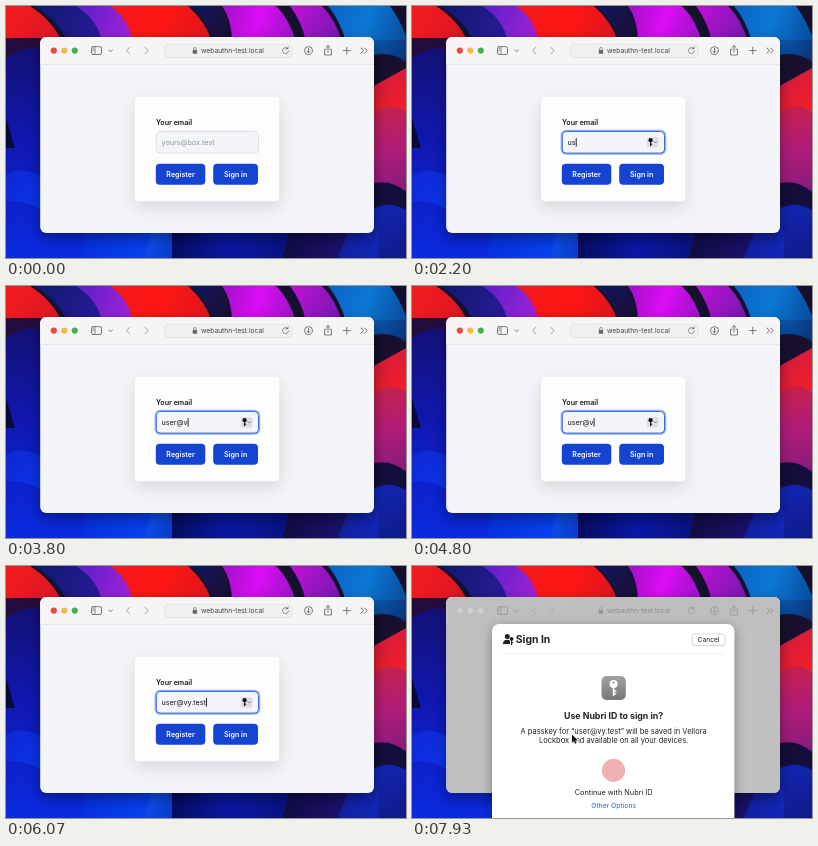
Write an HTML page with a canvas that moves like this. It is 400 px wide and 252 px high and loops after 8000 ms.

```html
<!DOCTYPE html>
<html lang="en">
<head>
<meta charset="utf-8">
<title>Passkey registration</title>
<style>
html, body { margin: 0; width: 100%; height: 100%; overflow: hidden; }
canvas { display: block; width: 400px; height: 252px; }
</style>
</head>
<body>
<canvas id="stage"></canvas>
<script>
const LOOP = 8000;
const FONT = 'Inter, "Liberation Sans", sans-serif';
const EMAIL = 'user@vy.test';
const KEY_TIMES = [2000, 2140, 2330, 2480, 2950, 3300, 4900, 5060, 5260, 5420, 5560, 5700];
const FOCUS = 1260, PRESS = 6860, SHEET = 7300;

const canvas = document.getElementById('stage');
const dpr = window.devicePixelRatio || 1;
canvas.width = 400 * dpr;
canvas.height = 252 * dpr;
const g = canvas.getContext('2d');
g.scale(dpr, dpr);

const clamp = x => Math.max(0, Math.min(1, x));
const ease = x => { x = clamp(x); return x * x * (3 - 2 * x); };
const mix = (a, b, k) => a + (b - a) * k;

function fade(x0, y0, x1, y1, ...colors) {
  const f = g.createLinearGradient(x0, y0, x1, y1);
  colors.forEach((c, i) => f.addColorStop(i / (colors.length - 1), c));
  return f;
}

function shape(d, fill) {
  g.fillStyle = fill;
  g.fill(new Path2D(d));
}

function line(d, color, width = 0.8) {
  g.strokeStyle = color;
  g.lineWidth = width;
  g.lineCap = g.lineJoin = 'round';
  g.stroke(new Path2D(d));
}

function box(x, y, w, h, r, fill, stroke, width = 0.7) {
  g.beginPath();
  g.roundRect(x, y, w, h, r);
  if (fill) { g.fillStyle = fill; g.fill(); }
  if (stroke) { g.strokeStyle = stroke; g.lineWidth = width; g.stroke(); }
}

function dot(x, y, r, fill) {
  g.beginPath();
  g.arc(x, y, r, 0, 7);
  g.fillStyle = fill;
  g.fill();
}

function shadowed(blur, dy, alpha, draw) {
  g.save();
  g.shadowColor = `rgba(0,0,0,${alpha})`;
  g.shadowBlur = blur * dpr;
  g.shadowOffsetY = dy * dpr;
  draw();
  g.restore();
}

function text(s, x, y, color, size = 7.2, weight = 400, align = 'left') {
  g.font = `${weight} ${size}px ${FONT}`;
  g.textAlign = align;
  g.fillStyle = color;
  g.fillText(s, x, y);
}

function wallpaper() {
  g.fillStyle = fade(0, 30, 20, 252, '#14106e', '#1018b4', '#0a2ae0');
  g.fillRect(0, 0, 400, 252);
  // top edge
  shape('M0 0H400V36H0Z', '#15102e');
  shape('M0 0H24Q46 14 56 36H0Z', fade(0, 0, 56, 36, '#f41c1c', '#d81626'));
  shape('M28 0H72Q92 14 100 36H62Q52 14 28 0Z', fade(35, 0, 95, 36, '#101a6e', '#2a1a9c'));
  shape('M70 0H112Q126 16 128 36H96Q92 14 70 0Z', fade(72, 0, 128, 30, '#5a20c8', '#a422d8'));
  shape('M104 0H182Q200 16 206 36H126Q124 14 104 0Z', fade(104, 0, 206, 20, '#f01a1e', '#ff1612', '#e01420'));
  shape('M184 0H214Q224 14 226 36H208Q204 16 184 0Z', fade(184, 0, 226, 20, '#10155e', '#1a1038'));
  shape('M216 0H270Q284 14 290 36H226Q226 14 216 0Z', fade(216, 0, 290, 24, '#a010c8', '#dc0cf4', '#9c14c8'));
  shape('M284 0H316Q330 14 336 36H300Q296 16 284 0Z', fade(284, 0, 336, 24, '#c010d8', '#7a18b0'));
  shape('M322 0H384Q394 14 400 30V36H340Q334 14 322 0Z', fade(322, 0, 400, 30, '#0c62c8', '#0a78d4', '#0a4c9c'));
  // left edge
  shape('M0 32H38V44Q18 38 0 52Z', '#240c3c');
  shape('M0 112L9 142H0Z', '#0a0a3a');
  shape('M0 168Q20 160 38 172V206Q18 192 0 196Z', fade(0, 165, 36, 200, '#1026d0', '#0a36ee'));
  // right edge
  shape('M364 34H400V58Q384 46 364 52Z', fade(366, 34, 400, 55, '#0a58b0', '#0a3478'));
  shape('M364 50Q384 44 400 56V70L364 84Z', '#18102e');
  shape('M364 82L400 62V108Q384 96 364 110Z', fade(370, 70, 400, 108, '#d41a3c', '#f42028'));
  shape('M364 108Q384 94 400 106V184H364Z', fade(370, 105, 390, 184, '#c4204e', '#b01c78', '#8a1c7c'));
  shape('M364 178Q384 172 400 186V206Q384 196 364 206Z', '#140e3c');
  shape('M364 204Q384 194 400 204V252H364Z', fade(366, 200, 400, 252, '#1226b8', '#0e1a86'));
  // bottom edge
  shape('M74 252L80 224H148L140 252Z', fade(78, 230, 146, 252, '#0630e0', '#0642f0'));
  shape('M138 252L146 224H170L166 252Z', fade(140, 230, 168, 252, '#0a52f0', '#0a38c8'));
  shape('M166 252V224H284L276 252Z', fade(166, 240, 282, 240, '#060c60', '#0818a4', '#0a1280'));
  shape('M276 252L284 224H344L332 252Z', fade(278, 240, 342, 240, '#100c44', '#1a1270'));
  shape('M332 252L344 224H372V252Z', fade(334, 240, 372, 240, '#1020a0', '#1226b8'));
}

function toolbar() {
  box(34.2, 31, 333.8, 27.5, [6, 6, 0, 0], '#f7f4f6');
  g.fillStyle = '#dfdce0';
  g.fillRect(34.2, 58, 333.8, 0.6);
  ['#f2453f', '#f7b845', '#3cb54e'].forEach((c, i) => dot(47.8 + 10.5 * i, 44.6, 3.1, c));
  const ink = '#5d5b60', pale = '#96949a';
  box(85.5, 40.7, 10, 7.8, 1.5, null, ink, 0.8);
  line('M89 41V48M86.8 42.8H87.7M86.8 44.4H87.7', ink, 0.7);
  line('M102.8 44L104.6 45.6L106.4 44', ink, 0.8);
  line('M123.7 41.4L120.5 44.6L123.7 47.8', pale, 0.9);
  line('M139 41.4L142.2 44.6L139 47.8', pale, 0.9);
  box(158.2, 38.2, 128, 13.3, 3.5, '#f2eff1', '#dedbdf', 0.6);
  box(186.7, 44, 4.4, 3.7, 0.7, '#69676c');
  line('M187.6 44V42.8A1.3 1.3 0 0 1 190.2 42.8V44', '#69676c', 0.7);
  text('webauthn-test.local', 195, 47.1, '#434146', 6.7);
  line('M281.7 42.5A3 3 0 1 0 282.5 45M282 40.8V42.8H280', ink, 0.7);
  g.beginPath();
  g.arc(302.5, 44.6, 4, 0, 7);
  g.lineWidth = 0.8;
  g.stroke();
  line('M302.5 42.3V46.6M300.9 45.1L302.5 46.7L304.1 45.1', ink);
  line('M320.2 43.2H318.6V49H325.4V43.2H323.8M322 46V39.7M320.3 41.2L322 39.6L323.7 41.2', ink);
  line('M337.3 44.6H344.3M340.8 41.1V48.1', ink);
  line('M355 42L357.5 44.6L355 47.2M358.5 42L361 44.6L358.5 47.2', ink, 0.9);
}

function button(label, x, w, color) {
  box(x, 157.8, w, 21, 4, color);
  text(label, x + w / 2, 171, '#fff', 7.1, 600, 'center');
}

function form(t) {
  const focused = t >= FOCUS && t < PRESS;
  const count = KEY_TIMES.filter(k => k <= t).length;
  const typed = EMAIL.slice(0, count);
  shadowed(16, 6, 0.13, () => box(129, 91, 144.3, 104.2, 4, '#fefdfe'));
  text('Your email', 150, 118.6, '#15191f', 7.1, 600);
  if (focused) box(149.6, 124.8, 103.6, 23, 4.5, null, '#8db0f2', 2);
  box(150.3, 125.5, 102.2, 21.6, 4, '#f3f5f8', focused ? '#3a70dc' : '#cfd3da', focused ? 1 : 0.7);
  if (count) text(typed, 155.5, 139, '#15191f');
  else text('yours@box.test', 155.5, 139, '#9297a1');
  if (focused) {
    const last = count ? KEY_TIMES[count - 1] : FOCUS;
    if ((t - last) % 1060 < 600) {
      g.font = `400 7.2px ${FONT}`;
      g.textAlign = 'left';
      g.fillStyle = '#111';
      g.fillRect(155.7 + g.measureText(typed).width, 132, 0.9, 8.6);
    }
    box(234.7, 131, 11.6, 10.6, 2, '#dcdee2');
    dot(238.6, 134.2, 2.1, '#111');
    line('M238.6 135V139.6M238.6 138.2H239.8', '#111', 1.1);
    line('M242.2 135.8L243.4 137L244.6 135.8', '#555', 0.7);
  }
  const hover = t >= 6640;
  button('Register', 149.8, 49.5, hover ? '#152f94' : '#1544d0');
  button('Sign in', 207.2, 44.8, '#1544d0');
}

function sheet(t) {
  const k = ease((t - SHEET) / 260);
  if (!k) return;
  g.save();
  g.globalAlpha = k;
  box(34.2, 31, 333.8, 196, 6, 'rgba(170,170,170,.7)');
  for (let i = 0; i < 3; i++) dot(47.8 + 10.5 * i, 44.6, 3.1, '#cfcfcf');
  const s = mix(0.9, 1, k);
  g.translate(201, 155);
  g.scale(s, s);
  g.translate(-201, -155);
  shadowed(12, 3, 0.35, () => box(80, 58, 242.4, 210, 7, '#fff'));
  const ink = '#202022';
  dot(95.3, 70.5, 2.5, ink);
  shape('M91 78Q91 73.8 95.2 73.8Q97.6 73.8 98 75V78Z', ink);
  dot(99.6, 72.8, 1.9, ink);
  line('M99.6 73.5V78.4M99.8 76.8H100.8', ink, 1.1);
  text('Sign In', 103.8, 77.2, ink, 10.4, 700);
  line('M91 88H312', '#e6e6e8', 0.6);
  shadowed(1, 0.4, 0.2, () => box(280.2, 67.7, 32.6, 11.4, 2.6, '#fff', '#e0e0e2', 0.5));
  text('Cancel', 296.5, 75.8, ink, 6.7, 400, 'center');
  box(189.5, 110, 24.3, 24, 5, fade(0, 110, 0, 134, '#a1a1a4', '#77777a'));
  dot(201.6, 118, 4, '#fff');
  dot(201.6, 116.5, 1.1, '#8f8f92');
  line('M201.6 121V129.2M202 125H203.8M202 127.8H203.6', '#fff', 1.6);
  const center = (str, y, color, size, weight) => text(str, 201.6, y, color, size, weight, 'center');
  center('Use Nubri ID to sign in?', 153.2, ink, 8.8, 700);
  center(`A passkey for “${EMAIL}” will be saved in Vellora`, 167.6, ink, 7.5);
  center('Lockbox and available on all your devices.', 177.2, ink, 7.5);
  dot(201.5, 204.4, 11.6, '#efb0b2');
  center('Continue with Nubri ID', 229.4, ink, 7.3);
  center('Other Options', 241.6, '#1673df', 6.8);
  g.restore();
}

function pointer(t) {
  const arriving = t >= 470 && t < KEY_TIMES[0];
  const leaving = t >= 6270;
  if (!arriving && !leaving) return;
  const k = arriving ? ease((t - 470) / 700) : ease((t - 6270) / 480);
  const x = arriving ? mix(200, 181, k) : mix(181, 160, k);
  const y = arriving ? mix(254, 137, k) : mix(137, 168.4, k);
  g.save();
  g.translate(x, y);
  const inField = y > 125 && y < 147;
  if (inField) {
    line('M-1.5 -4Q0 -4 0 -3V3Q0 4 -1.5 4M1.5 -4Q0 -4 0 -3M0 3Q0 4 1.5 4', '#222', 0.8);
  } else if (leaving && y > 158 && t < SHEET) {
    const hand = 'M-1 0Q0 -1 1 0V3.2Q2 2.6 2.6 3.5Q3.7 3 4 4Q5.2 3.8 5.2 5V7Q5 8.4 4.2 9.4H0Q-1.8 7.4 -3 5.4Q-2.6 4.2 -1 5.6Z';
    shape(hand, '#fff');
    line(hand, '#111', 0.7);
    line('M1.4 6V8M3 6V8', '#111', 0.5);
  } else {
    const arrow = 'M0 0V8.2L1.9 6.5L3.2 9.3L4.5 8.7L3.2 6H5.8Z';
    line(arrow, '#fff', 1.2);
    shape(arrow, '#111');
  }
  g.restore();
}

function draw(now) {
  const t = now % LOOP;
  wallpaper();
  shadowed(14, 5, 0.4, () => box(34.2, 31, 333.8, 196, 6, '#f4f5f8'));
  toolbar();
  form(t);
  sheet(t);
  pointer(t);
}

const start = performance.now();
function tick() {
  draw(performance.now() - start);
  requestAnimationFrame(tick);
}
tick();
</script>
</body>
</html>
```
